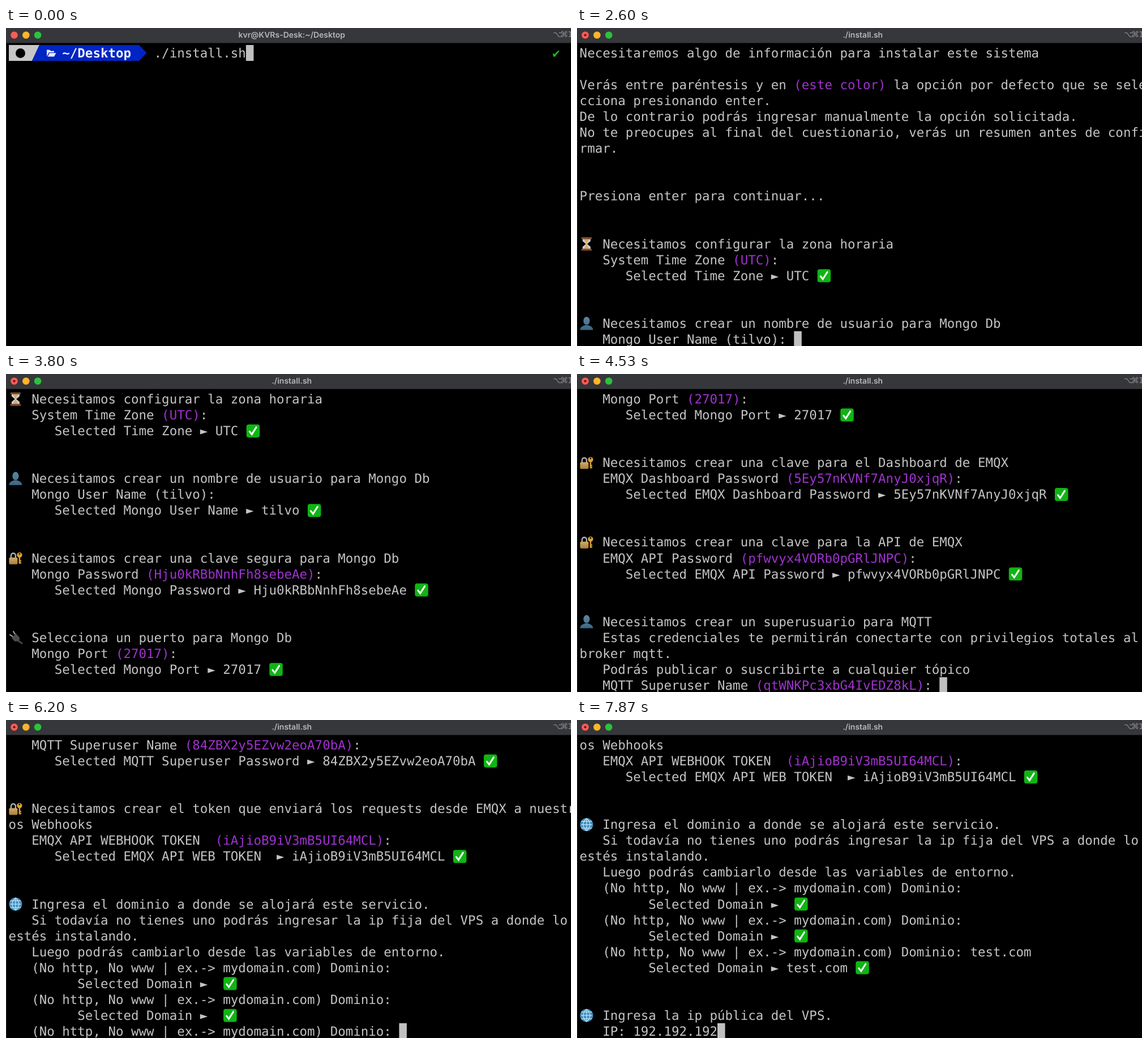
These frames come from a looping animation (998x561 px, 8000 ms). An HTML page with a canvas:

```html
<!DOCTYPE html>
<html lang="es">
<head>
<meta charset="utf-8">
<title>Terminal</title>
<style>
html, body { margin: 0; width: 100%; height: 100%; overflow: hidden; background: #000; }
canvas { display: block; }
</style>
</head>
<body>
<canvas id="stage" width="998" height="561"></canvas>
<!-- Braces mark the accent colour. -->
<script type="text/plain" id="log">
{ / /\/ _ \/ __| / _ \| '_ \ / _` |  / /_\// /}
{/ / |  __/\__ \| (_) | | | | (_| | / /_\/ /___}
{\/   \___||___/ \___/|_| |_|\__,_| \____/\____/}
{                                    ioticos.org}




Necesitaremos algo de información para instalar este sistema

Verás entre paréntesis y en {(este color)} la opción por defecto que se sele
cciona presionando enter.
De lo contrario podrás ingresar manualmente la opción solicitada.
No te preocupes al final del cuestionario, verás un resumen antes de confi
rmar.


Presiona enter para continuar...


⏳ Necesitamos configurar la zona horaria
   System Time Zone {(UTC)}:
      Selected Time Zone ► UTC ✅


👤 Necesitamos crear un nombre de usuario para Mongo Db
   Mongo User Name (tilvo):
      Selected Mongo User Name ► tilvo ✅


🔐 Necesitamos crear una clave segura para Mongo Db
   Mongo Password {(Hju0kRBbNnhFh8sebeAe)}:
      Selected Mongo Password ► Hju0kRBbNnhFh8sebeAe ✅


🔌 Selecciona un puerto para Mongo Db
   Mongo Port {(27017)}:
      Selected Mongo Port ► 27017 ✅


🔐 Necesitamos crear una clave para el Dashboard de EMQX
   EMQX Dashboard Password {(5Ey57nKVNf7AnyJ0xjqR)}:
      Selected EMQX Dashboard Password ► 5Ey57nKVNf7AnyJ0xjqR ✅


🔐 Necesitamos crear una clave para la API de EMQX
   EMQX API Password {(pfwvyx4VORb0pGRlJNPC)}:
      Selected EMQX API Password ► pfwvyx4VORb0pGRlJNPC ✅


👤 Necesitamos crear un superusuario para MQTT
   Estas credenciales te permitirán conectarte con privilegios totales al
broker mqtt.
   Podrás publicar o suscribirte a cualquier tópico
   MQTT Superuser Name {(qtWNKPc3xbG4IvEDZ8kL)}:
      Selected MQTT Superuser Name ► qtWNKPc3xbG4IvEDZ8kL ✅


🔐 Necesitamos crear una clave para el superusuario MQTT
   MQTT Superuser Name {(84ZBX2y5EZvw2eoA70bA)}:
      Selected MQTT Superuser Password ► 84ZBX2y5EZvw2eoA70bA ✅


🔐 Necesitamos crear el token que enviará los requests desde EMQX a nuestr
os Webhooks
   EMQX API WEBHOOK TOKEN  {(iAjioB9iV3mB5UI64MCL)}:
      Selected EMQX API WEB TOKEN  ► iAjioB9iV3mB5UI64MCL ✅


🌐 Ingresa el dominio a donde se alojará este servicio.
   Si todavía no tienes uno podrás ingresar la ip fija del VPS a donde lo
estés instalando.
   Luego podrás cambiarlo desde las variables de entorno.
   (No http, No www | ex.-> mydomain.com) Dominio:
         Selected Domain ►  ✅
   (No http, No www | ex.-> mydomain.com) Dominio:
         Selected Domain ►  ✅
   (No http, No www | ex.-> mydomain.com) Dominio: test.com
         Selected Domain ► test.com ✅


🌐 Ingresa la ip pública del VPS.
   IP: 192.192.192
</script>
<script>
const ctx = document.getElementById('stage').getContext('2d');
ctx.textRendering = 'geometricPrecision';
const log = document.getElementById('log').textContent.split('\n').slice(1);

const LOOP = 8000, START = 1000;
const LEFT = 4.6, TOP = 30, CELL = 13.525, ROW = 28.05, LAST = 18;
const GREY = '#c4c4c4', ACCENT = '#a032cf';
const MONO = '22.46px "DejaVu Sans Mono", monospace';

// A prompt ends in a colon, perhaps followed by the answer typed there.
const prompts = [...log.keys()].filter(i => /:( \S+)?$/.test(log[i]));
// When each prompt appears; the output before it prints for a moment.
const asked = [1800, 2600, 3130, 3470, 3870, 4200, 4530, 4930, 5470, 5870, 6200, 6200, 7470];
const PRINT = 70;
const TYPE_AT = 6330, KEY = 142, PASTE_AT = 7870;

function typedCount(answer, t) {
  if (answer.startsWith('test')) return Math.max(0, Math.floor((t - TYPE_AT) / KEY) + 1);
  return t < PASTE_AT ? 0 : answer.length;
}

function poly(color, ...pts) {
  ctx.fillStyle = color;
  ctx.beginPath();
  for (let i = 0; i < pts.length; i += 2) ctx.lineTo(pts[i], pts[i + 1]);
  ctx.closePath();
  ctx.fill();
}

function oval(color, x, y, rx, ry = rx) {
  ctx.fillStyle = color;
  ctx.beginPath();
  ctx.ellipse(x, y, rx, ry, 0, 0, 7);
  ctx.fill();
}

function box(color, x, y, w, h, r = 0) {
  ctx.fillStyle = color;
  ctx.beginPath();
  ctx.roundRect(x, y, w, h, r);
  ctx.fill();
}

function stroke(color, width, path) {
  ctx.strokeStyle = color;
  ctx.lineWidth = width;
  ctx.stroke(new Path2D(path));
}

function shade(from, to) {
  const g = ctx.createLinearGradient(0, -12, 0, 12);
  g.addColorStop(0, from);
  g.addColorStop(1, to);
  return g;
}

// Icons are drawn around the middle of a two-cell slot.
const icons = {
  '✅'() {
    box('#10b414', -11.5, -11.5, 23.5, 23, 4);
    ctx.lineCap = 'round';
    stroke('#fff', 3, 'M-6 1 L-2 6 L6 -6.5');
  },
  '⏳'() {
    for (const side of [-1, 1]) {
      poly('#c9d3d8', -7, 10 * side, 7, 10 * side, 7, 5 * side, 0, -side, -7, 5 * side);
      poly('#e0a860', -5, 9 * side, 5, 9 * side, 0, 0);
      box('#7a4a30', -9.5, 10.2 * side - 1.7, 19, 3.4, 1.5);
    }
  },
  '👤'() {
    const blue = shade('#5d87a3', '#3a6584');
    oval(blue, 0, -4.5, 5.6, 7.2);
    ctx.fill(new Path2D('M-11.5 11.5 C-11 5 -6 5 -3 3 H3 C6 5 11 5 11.5 11.5 Z'));
  },
  '🔐'() {
    stroke('#aeb1b5', 2.4, 'M-8 0 V-4 C-8 -10 0 -10 0 -4 V0');
    box(shade('#f0d48a', '#a87c38'), -11.5, -1, 15, 12, 2);
    stroke('#d69a2e', 2.6, 'M7 -2 V10 M7 5 H10 M7 8.5 H10');
    oval('#dfa235', 7, -5.5, 4.6);
    oval('#000', 7, -7.5, 1.4);
  },
  '🔌'() {
    ctx.lineCap = 'round';
    stroke('#a9a9a9', 2, 'M-10 -5 L-5 -2 M-4 -11 L-1 -6');
    poly('#4d4d4d', -7, 1, 1, -7, 7, 0, 7, 6, -1, 7);
    stroke('#444', 3, 'M5 6 L11 10');
  },
  '🌐'() {
    oval('#3f8fbe', 0, 0, 11.5);
    for (const k of [-6, 0, 6]) stroke('#c6e4f3', 1.2, `M-9.5 ${k} H9.5 M0 -11 Q${2 * k} 0 0 11`);
  }
};

const colX = col => LEFT + col * CELL;

// Draws one row on the cell grid and returns the column after it.
function drawText(text, row, col = 0, color = GREY, font = MONO) {
  const y = TOP + row * ROW;
  ctx.font = font;
  ctx.fillStyle = color;
  for (const ch of text) {
    if (ch === '{') ctx.fillStyle = ACCENT;
    else if (ch === '}') ctx.fillStyle = color;
    else if (icons[ch]) {
      ctx.save();
      ctx.translate(colX(col) + 12.3, y + 14.3);
      icons[ch]();
      ctx.restore();
      col += 2;
    } else ctx.fillText(ch, colX(col++), y + 22);
  }
  return col;
}

function drawCursor(col, row) {
  box('#c0c0c0', colX(col), TOP + row * ROW, CELL, ROW);
}

function drawBar(title, busy) {
  box('#36373b', 0, 0, 998, 27);
  box('#1b1b1d', 0, 26, 998, 1);
  ['#fc5b57', '#fdb52a', '#2cc23c'].forEach((c, i) => oval(c, 14.5 + i * 20.8, 12.5, 6.3));
  if (busy) oval('#6d0f0c', 14.5, 12.5, 2.1);
  ctx.fillStyle = '#b6b7b9';
  ctx.font = '600 14px Inter, sans-serif';
  ctx.textAlign = 'center';
  ctx.fillText(title, 504.8, 17);
  ctx.textAlign = 'left';
  ctx.fillStyle = '#8b8c8f';
  ctx.font = '14px "DejaVu Sans", sans-serif';
  [...'⌥⌘1'].forEach((ch, i) => ctx.fillText(ch, 966 + i * 13, 16));
}

function drawPrompt() {
  poly('#c7c7c7', 5, 30, 59, 30, 46, 58, 5, 58);
  poly('#0124c4', 59, 30, 235, 30, 248.5, 44, 235, 58, 46, 58);
  oval('#000', 25.5, 44.5, 8.5);
  poly('#e8e8ee', 72, 50, 72, 38.5, 77, 38.5, 79, 40.5, 85, 40.5, 85, 43, 76, 43);
  poly('#e8e8ee', 77, 44, 88.5, 44, 85, 50.5, 73.5, 50.5);
  drawText('~/Desktop', 0, 7, '#f0f0f4', 'bold ' + MONO);
  drawCursor(drawText('./install.sh', 0, 19), 0);
  drawText('✔', 0, 71, '#1cb81c');
}

function drawLog(t) {
  const n = asked.findLastIndex(at => t >= at);
  const printing = n < 0 || t >= asked[n + 1] - PRINT;
  const bottom = n < 0 ? LAST : prompts[n] + (printing ? 2 : 0);
  for (let row = 0; row < LAST; row++) drawText(log[bottom - LAST + row], row);
  if (printing) return;
  const [, ask, answer] = log[bottom].match(/^(.*:) ?(\S*)$/);
  const typed = answer.slice(0, typedCount(answer, t));
  drawCursor(drawText(ask + ' ' + typed, LAST), LAST);
}

function frame(now) {
  const t = now % LOOP, busy = t >= START;
  box('#000', 0, 0, 998, 561);
  box('#2a2a2b', 0, 27, 1, 534);
  if (busy) drawLog(t);
  else drawPrompt();
  drawBar(busy ? './install.sh' : 'kvr@KVRs-Desk:~/Desktop', busy);
  requestAnimationFrame(frame);
}
requestAnimationFrame(frame);
</script>
</body>
</html>
```
